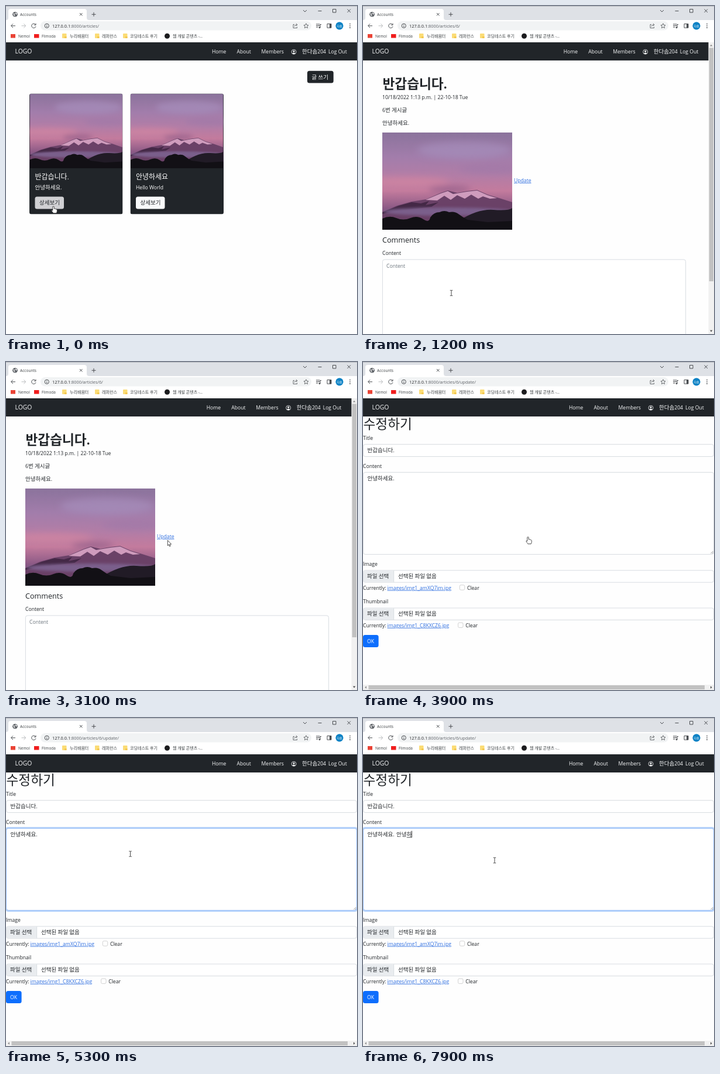
Recreate the animation shown at these times as an HTML page. Size 600 by 560 pixels, loop 8 s.

```html
<!DOCTYPE html>
<html lang="ko">
<head>
<meta charset="utf-8">
<title>Accounts</title>
<style>
html, body { margin: 0; width: 100%; height: 100%; overflow: hidden; background: #fefefe; }
svg { display: block; }
text { font-family: "Open Sans", "Noto Sans", "Noto Sans CJK KR", sans-serif; white-space: pre; }
.ko { font-family: "Noto Sans CJK KR", "Noto Sans CJK JP", sans-serif; font-size: 1.1em; }
.line { fill: none; stroke: #4a4d51; stroke-width: 1; }
</style>
</head>
<body>
<svg id="stage" width="600" height="560" viewBox="0 0 600 560">
  <defs>
    <linearGradient id="sky" x2="0" y2="1">
      <stop offset="0" stop-color="#8b739c"/>
      <stop offset=".25" stop-color="#a27dab"/>
      <stop offset=".45" stop-color="#b37da6"/>
      <stop offset=".6" stop-color="#c37b9d"/>
      <stop offset=".78" stop-color="#8b5985"/>
      <stop offset="1" stop-color="#57486a"/>
    </linearGradient>
    <filter id="soft" x="-30%" y="-100%" width="160%" height="300%"><feGaussianBlur stdDeviation="6"/></filter>
    <filter id="mist" x="-30%" y="-100%" width="160%" height="300%"><feGaussianBlur stdDeviation="2"/></filter>
    <clipPath id="cardEdge"><rect width="159.5" height="206" rx="3.5"/></clipPath>
    <symbol id="photo" viewBox="0 0 222 166" preserveAspectRatio="none">
      <rect width="222" height="166" fill="url(#sky)"/>
      <g filter="url(#soft)">
        <ellipse cx="140" cy="30" rx="80" ry="14" fill="#a68dbb" opacity=".7"/>
        <ellipse cx="190" cy="62" rx="60" ry="9" fill="#a07aa9" opacity=".7"/>
        <ellipse cx="40" cy="84" rx="75" ry="8" fill="#d487a1" opacity=".7"/>
        <ellipse cx="115" cy="97" rx="36" ry="5" fill="#94608b"/>
      </g>
      <path fill="#6a4167" d="M0 136L25 125 50 118 75 114 100 103 112 99 128 103 145 100 162 98 180 106 200 112 222 119V152H0Z"/>
      <path fill="#cf9cbd" d="M74 115L100 104 112 100 121 105 145 101 162 99 180 107 196 112 184 113 172 109 164 113 152 106 141 113 128 107 117 115 106 108 94 116Z"/>
      <path fill="#442846" d="M0 136L28 125 50 119 66 121 80 117 74 124 96 119 84 127 50 131 24 134 0 139Z"/>
      <ellipse cx="112" cy="135" rx="110" ry="7" fill="#7a5f8b" filter="url(#mist)"/>
      <path fill="#211b26" d="M132 150Q164 130 190 132T222 129V166H132Z"/>
      <path fill="#121015" d="M0 147Q12 141 24 146T48 146 70 148 82 145Q88 136 98 136 106 132 114 136 124 134 130 139 138 145 146 149L180 153 222 151V166H0Z"/>
    </symbol>
  </defs>
  <g id="page"></g>
  <g id="field"></g>
  <g id="chrome"></g>
  <g id="cursor"></g>
</svg>
<script>
const LOOP = 8000, STEP = 100, DARK = '#212529', GREY = '#5f6368', BLUE = '#0d6efd';
const byId = id => document.getElementById(id);

const text = (x, y, s, size = 8.65, fill = DARK, extra = '') =>
  `<text x="${x}" y="${y}" font-size="${size}" fill="${fill}" ${extra}>` +
  s.replace(/[ㄱ-ㅣ가-힣]+/g, k => `<tspan class="ko">${k}</tspan>`) + '</text>';
const box = (x, y, w, h, fill, rx = 0, extra = '') =>
  `<rect x="${x}" y="${y}" width="${w}" height="${h}" rx="${rx}" fill="${fill}" ${extra}/>`;
const dot = (x, y, r, fill, extra = '') => `<circle cx="${x}" cy="${y}" r="${r}" fill="${fill}" ${extra}/>`;
const line = (d, extra = '') => `<path class="line" d="${d}" ${extra}/>`;
const shape = (d, fill) => `<path d="${d}" fill="${fill}"/>`;
const link = (x, y, s) => text(x, y, s, 8.65, '#2f6fe0', 'text-decoration="underline"');
const input = (x, y, w, h) => box(x, y, w, h, '#fff', 3.5, 'stroke="#ced4da" stroke-width=".8"');

function browser(path) {
  const folder = x => box(x, 47, 7.5, 8, '#fbdc76', 1) + box(x + 4, 52, 3.5, 3, '#f3c74e');
  const mark = (x, s) => text(x, 53.6, s, 6.4, '#3c4043');
  return box(0, 0, 600, 24, '#dee1e6') + box(0, 0, 600, 1, '#b9bcc1') +
    shape('M0 24Q4 24 4 20V9Q4 5 8 5H134Q138 5 138 9V20Q138 24 142 24Z', '#fff') +
    dot(15.5, 14.2, 4.3, GREY) + shape('M12.6 12.2L15 13 14.2 15 16 17.4 13.5 16.5ZM16 10.8L18.6 12.6 17.8 15 16.4 13.6Z', '#fff') +
    text(24, 16.6, 'Accounts', 6.6, '#3c4043') +
    line('M126 12L130.5 16.5M130.5 12L126 16.5M146.5 14.3H153.5M150 10.8V17.8') +
    line('M508 7L511 10 514 7M533.5 8.5H539.5M558.5 5.5H564V11H558.5ZM583.5 5.5L589 11M589 5.5L583.5 11') +
    box(0, 24, 600, 38, '#fff') + box(59, 26, 463, 15.5, '#f1f3f4', 7.7) +
    line('M16 33.8H8.8M12 30.4L8.6 33.8 12 37.2') +
    line('M26.5 33.8H33.5M30.4 30.4L33.8 33.8 30.4 37.2', 'style="stroke:#babcbe"') +
    line('M50.4 31.6A3.7 3.7 0 1 0 51 34.8M51 29.8V32.4H48.2') +
    line('M69.8 33.4V36M69.8 31.4V32.3') + dot(69.8, 33.8, 3.6, 'none', 'class="line"') +
    text(79, 36.5, `127.0.0.1<tspan fill="${GREY}">:8000/articles/${path}</tspan>`, 7.37, '#202124') +
    line('M493 31.5H491V37.5H497.5V35.5M493 35Q493.4 32 497.5 32M495.8 29.8L498 32 495.8 34.2', 'style="stroke-width:.8"') +
    line('M513 29.8L514.2 32.5 517 32.8 514.9 34.7 515.5 37.6 513 36.1 510.5 37.6 511.1 34.7 509 32.8 511.8 32.5Z', 'style="stroke-width:.8"') +
    line('M530 31H536.5M530 33.5H536.5M530 36H533.5M537 37V31.5H539') + dot(536, 36.8, 1.4, '#4a4d51') +
    line('M549 30.5H556V37.2H549Z') + box(553, 30.5, 3, 6.7, '#4a4d51') +
    dot(570, 33.8, 6.6, '#0d82c5') + text(565.4, 35.5, '다솜', 4.5, '#fff') +
    [30.6, 33.8, 37].map(y => dot(588, y, .9, '#4a4d51')).join('') +
    box(8, 48, 8, 6.5, '#ea4335') + mark(21, 'Nemol') +
    box(48, 48, 8.5, 6.5, '#f01d1d') + mark(61, 'Flimoda') +
    folder(96) + mark(109, '누리배움터') + folder(152) + mark(164, '레퍼런스') +
    folder(200) + mark(212, '코딩테스트 후기') +
    dot(275.5, 51.3, 4.5, '#1c1c1e') + mark(285, '웹 개발 콘텐츠 -...');
}

function navbar(dx = 0) {
  const item = (x, s) => text(x + dx, 80.8, s, 8.65, '#f8f9fa');
  return box(0, 62, 600, 31, DARK) + text(15.5, 81.4, 'LOGO', 10.4, '#f8f9fa') +
    item(352, 'Home') + item(394.5, 'About') + item(436.5, 'Members') +
    dot(492 + dx, 78.3, 4, 'none', 'stroke="#f8f9fa" stroke-width=".8"') +
    dot(492 + dx, 77.2, 1.5, '#f8f9fa') + shape(`M${489.2 + dx} 81Q${492 + dx} 77.8 ${494.8 + dx} 81L${492 + dx} 82.3Z`, '#f8f9fa') +
    item(506, '한다솜204') + item(551, 'Log Out');
}

function card(x, title, body, button) {
  return `<g transform="translate(${x} 149.5)"><g clip-path="url(#cardEdge)">` +
    box(0, 0, 159.5, 206, DARK) + '<use href="#photo" x=".5" y=".6" width="158.5" height="127"/></g>' +
    text(9.5, 146.7, title, 10.9, '#fff') + text(9.5, 163.7, body, 8.65, '#fff') +
    box(9.5, 176, 49.5, 21, button, 3.5) + text(17, 189.8, '상세보기') + '</g>';
}

function listPage() {
  return navbar() + box(515, 110.8, 44.8, 20.8, DARK, 3.5) + text(522.5, 124.5, '글 쓰기', 8.65, '#fff') +
    card(40, '반갑습니다.', '안녕하세요.', '#d0d0d3') + card(212.5, '안녕하세요', 'Hello World', '#f8f9fa');
}

function detailPage() {
  return navbar(-9.3) + text(33.5, 140.8, '반갑습니다.', 20.6, DARK, 'font-weight="700"') +
    text(33, 159.2, '10/18/2022 1:13 p.m. | 22-10-18 Tue') + text(33, 181.2, '6번 게시글') +
    text(33, 203.2, '안녕하세요.') + '<use href="#photo" x="33" y="216" width="222" height="166"/>' +
    link(258, 300.8, 'Update') + text(33, 403.8, 'Comments', 12.6) + text(33, 425, 'Content') +
    input(33.4, 432.9, 518.2, 150) + text(40, 446.8, 'Content', 8.65, '#6c757d') +
    box(590.5, 62, 9.5, 498, '#f1f1f1') + box(591.7, 71.5, 7.3, 398.5, '#c1c1c1') +
    shape('M593 68.6L595.2 65.8 597.4 68.6Z', '#8a8a8a') + shape('M593 553.6L595.2 556.4 597.4 553.6Z', '#505050');
}

function fileRow(y, label, file, checkX) {
  return text(0, y, label) + input(.4, y + 8.2, 599.2, 20.4) +
    shape(`M.8 ${y + 11.6}Q.8 ${y + 8.6} 3.8 ${y + 8.6}H52.6V${y + 28.2}H3.8Q.8 ${y + 28.2} .8 ${y + 25.2}Z`, '#e9ecef') +
    box(52.4, y + 8.6, .7, 19.6, '#ced4da') + text(7, y + 21.6, '파일 선택') + text(60, y + 21.6, '선택된 파일 없음') +
    text(0, y + 41, 'Currently:') + link(41.5, y + 41, file) +
    box(checkX, y + 33.2, 8.4, 8.4, '#fff', 2, 'stroke="#bfbfbf" stroke-width=".7"') + text(checkX + 12.6, y + 41, 'Clear');
}

function updatePage() {
  return navbar() + text(.5, 114, '수정하기', 20.6, DARK, 'font-weight="500"') +
    text(0, 132.6, 'Title') + input(.4, 140.6, 599.2, 20.8) + text(7.5, 154.4, '반갑습니다.') +
    text(0, 180.6, 'Content') +
    fileRow(347.6, 'Image', 'images/img1_amXQ7im.jpg', 165.3) +
    fileRow(411.8, 'Thumbnail', 'images/img1_C8KXCZ6.jpg', 162.6) +
    box(0, 466, 26.6, 21, BLUE, 3.5) + text(7, 480, 'OK', 8.65, '#fff') +
    box(0, 551, 600, 9, '#f1f1f1') + box(9.5, 552, 574.5, 7, '#c1c1c1') +
    shape('M5.8 553.3L3.2 555.5 5.8 557.7Z', '#8a8a8a') + shape('M594 553.3L596.6 555.5 594 557.7Z', '#505050');
}

const pages = [
  { at: 0, path: '', draw: listPage },
  { at: 400, path: '6/', draw: detailPage },
  { at: 3900, path: '6/update/', draw: updatePage },
];

// Composition states of the typed word
const typed = [[0, ''], [7100, 'ㅇ'], [7200, '아'], [7300, '안'], [7500, '안ㄴ'], [7600, '안녀'], [7700, '안녕'], [7900, '안녕하']];
// Caret [time, x]; 0 hides it
const caret = [[0, 0], [4700, 53.3], [5300, 0], [5800, 53.3], [6300, 0], [6500, 57], [7000, 0], [7100, 57]];
const latest = (rows, t) => rows.filter(r => r[0] <= t).pop();

function textarea(t) {
  const ring = Math.min(1, Math.max(0, (t - 4700) / 150));
  const word = latest(typed, t)[1], end = 57 + 8.75 * word.length;
  const at = latest(caret, t)[1];
  const x = word ? end : at;
  return box(-.7, 187.2, 601.4, 142.4, 'none', 4.5, `stroke="#bcd6fb" stroke-width="2.6" opacity="${ring}"`) +
    input(.4, 188.4, 599.2, 140) +
    box(.4, 188.4, 599.2, 140, 'none', 3.5, `stroke="#86b7fe" stroke-width=".9" opacity="${ring}"`) +
    line('M594.5 327L598.5 323M597 327L598.5 325.5', 'style="stroke-width:.6"') +
    text(7.5, 202, '안녕하세요.') + text(57, 202, word) +
    (word ? box(end - 8.5, 203.4, 8.3, .8, DARK) : '') +
    (at ? box(x - .4, 192.7, .9, 11.4, '#111') : '');
}

const pointers = {
  hand: '<path d="M-1.2 .8C-1.2-.4 1.2-.4 1.2 .8V4.2C2.4 3.6 3.2 4 3.3 4.6 4.2 4.2 4.9 4.6 5 5.3 5.8 5.1 6.3 5.7 6.3 6.5V8.6C6.3 10 5.4 10.6 5.2 11.8H-.2C-.6 10.5-2.8 8.6-3.1 7.2-3.1 6.2-2 6.2-1.2 7.2Z" fill="#fff" stroke="#222" stroke-width=".8"/>',
  arrow: '<path d="M.3 .4V9.5L2.3 7.7 3.7 10.8 5.1 10.2 3.8 7.1H6.6Z" fill="#fff" stroke="#222" stroke-width=".8"/>',
  beam: '<path d="M-2.2-4.6H-.6L0-4.2 .6-4.6H2.2M0-4.2V4.2M-2.2 4.6H-.6L0 4.2 .6 4.6H2.2" fill="none" stroke="#333" stroke-width=".9"/>',
  none: '',
};
const track = [
  [0, 81, 342, 'hand'], [400, 81, 342, 'hand'], [600, 83, 339.5, 'hand'], [700, 90, 353, 'arrow'],
  [1000, 140, 468, 'beam'], [1200, 151, 490, 'beam'], [1500, 151, 490, 'beam'], [1700, 200, 420, 'arrow'],
  [2100, 283, 312, 'arrow'], [2400, 246, 332, 'arrow'], [2700, 277, 302, 'arrow'], [2800, 285, 295, 'hand'],
  [2900, 285, 295, 'hand'], [3000, 280, 301, 'arrow'], [3100, 276, 304, 'arrow'], [3300, 299, 304, 'arrow'],
  [3500, 284, 298, 'hand'], [3600, 282, 297, 'hand'], [4100, 282, 300, 'beam'], [4200, 282, 300, 'beam'],
  [4700, 210, 257, 'beam'], [5100, 212, 242, 'beam'], [5300, 212.5, 232, 'beam'], [5600, 212.5, 232, 'none'],
  [6000, 218, 238, 'beam'], [6100, 225, 243, 'beam'], [LOOP, 225, 243, 'beam'],
];

function cursor(t) {
  const i = track.findIndex(k => k[0] > t) - 1;
  const [t0, x0, y0, kind] = track[i], [t1, x1, y1] = track[i + 1];
  const k = (t - t0) / (t1 - t0);
  return `<g transform="translate(${x0 + (x1 - x0) * k} ${y0 + (y1 - y0) * k})">${pointers[kind]}</g>`;
}

let shownPage, shownTime;
function render(t) {
  if (t === shownTime) return;
  shownTime = t;
  const page = pages.filter(p => p.at <= t).pop();
  if (page !== shownPage) {
    byId('page').innerHTML = page.draw();
    byId('chrome').innerHTML = browser(page.path);
    shownPage = page;
  }
  byId('field').innerHTML = page === pages[2] ? textarea(t) : '';
  byId('cursor').innerHTML = cursor(t);
}

const start = performance.now();
function tick() {
  const t = (performance.now() - start) % LOOP;
  render(Math.floor(t / STEP) * STEP);
  requestAnimationFrame(tick);
}
tick();
</script>
</body>
</html>
```
